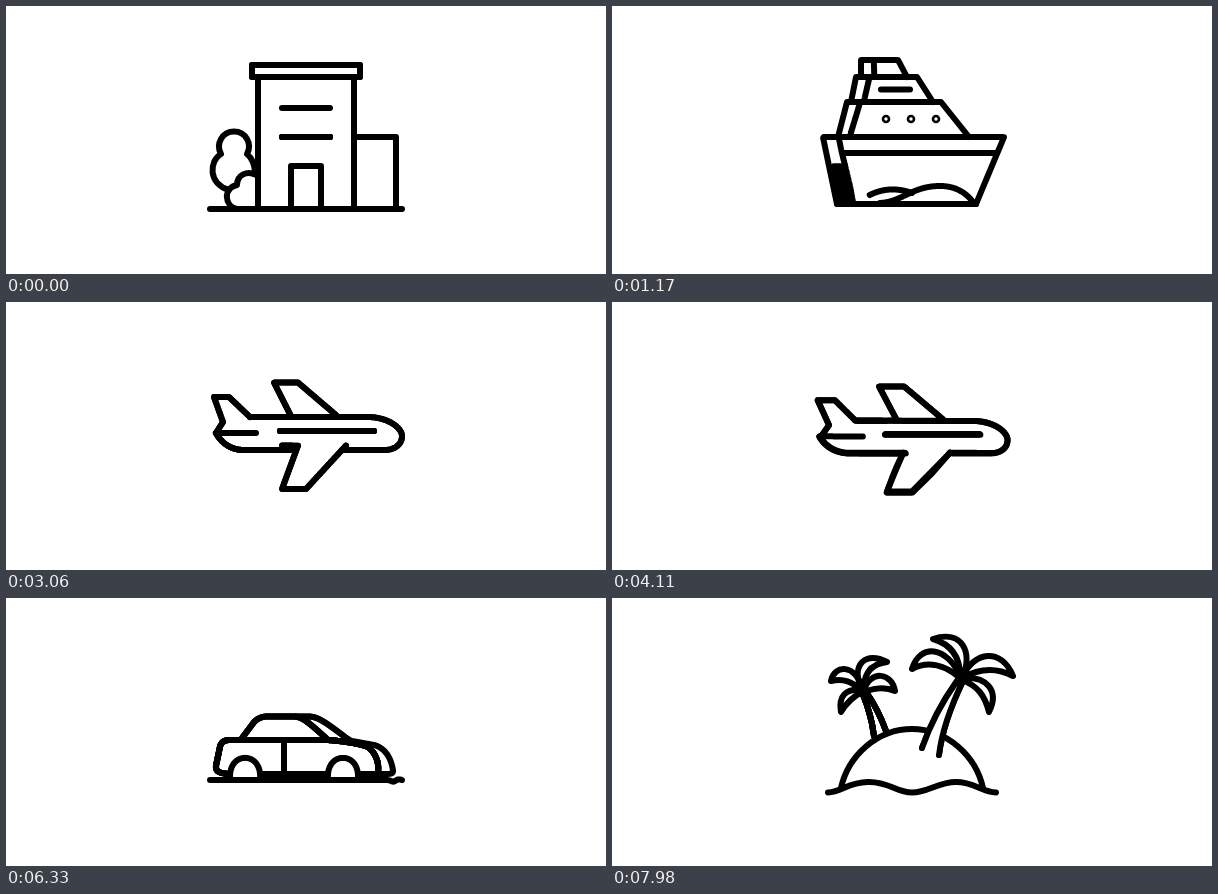
Recreate the animation shown at these times as an HTML page. Size 600 by 268 pixels, loop 8 s.

```html
<!DOCTYPE html>
<html lang="en">
<head>
<meta charset="utf-8">
<title>Morphing travel icons</title>
<style>
html, body { margin: 0; width: 100%; height: 100%; overflow: hidden; background: #fff; }
svg { display: block; width: 100vw; height: 100vh; }
path { fill: none; stroke: #000; stroke-width: 6; stroke-linecap: round; stroke-linejoin: round; }
</style>
</head>
<body>
<svg viewBox="0 0 600 268"><g id="icon"></g></svg>
<script>
const LOOP = 8000, SAMPLES = 200, BLOB = 16;
const icon = document.getElementById('icon');

const newPath = () => document.createElementNS('http://www.w3.org/2000/svg', 'path');
const ring = (x, y, r) => `M${x - r} ${y}a${r} ${r} 0 1 1 ${2 * r} 0a${r} ${r} 0 1 1 ${-2 * r} 0Z`;
const dot = (x, y) => ring(x, y, 1.3);
const speck = (x, y) => ring(x, y, 0.1);
const linear = k => k;
const leave = k => k ** 3;
const settle = k => 1 - (1 - k) ** 6;

// Each pose lists 17 strokes; a number repeats another stroke of the same pose.
const building = [
  'M204 203H396',
  'M252 203V71H348V203',
  'M246 59H354V71H246Z',
  'M348 131H390V203',
  'M285 203V160H315V203',
  'M276 102H324',
  'M276 131H324',
  'M223 184C202 178 203 155 215 148A15 15 0 1 1 241 148C246 152 249 158 249 168',
  'M231 203C218 200 217 182 231 179C231 169 241 164 250 169',
  6, 6, 6, 1, 1, 2, 1,
  speck(252, 200)
];

const shipForming = [
  'M225 198H364',
  'M225 198L211 131H392L364 198',
  'M249 71V54H286L295 71',
  'M226 131L235 96H329L357 131',
  'M239 96L244 71H305L321 96',
  'M269 83.5H298',
  'M232 147H384',
  'M258 189C272 182 286 182 300 187',
  'M268 197C290 196 300 180 328 180C344 180 354 187 361 196',
  dot(274, 113), dot(299, 113), dot(324, 113),
  'M238 131L247 97',
  'M252 96L257 71',
  'M262 54V71',
  'M227 132L240 196',
  'M222 160L229 160L240 197L227 197Z'
];

const ship = [
  'M220 198H366',
  'M220 198L204 131H396L366 198',
  'M249 71V53H286L295 71',
  'M226 131L235 96H329L357 131',
  'M239 96L244 71H305L321 96',
  'M269 83.5H298',
  'M210 147H388',
  'M222 190C244 182 276 178 300 187',
  'M260 197C284 196 298 180 328 180C346 180 356 187 365 196',
  dot(274, 113), dot(299, 113), dot(324, 113),
  3, 4, 2, 1,
  speck(222, 198)
];

const planeForming = [
  'M210 131C216 142 226 148 238 148H290',
  'M244 115H362C382 115 396 126 396 134C396 143 388 148 378 148H338',
  'M285 114L268 80.5H292L330 113',
  'M276 143.5H292L276 187H300L340 143.5',
  'M244 115L223 95H208L217 120L210 131',
  'M274 129H368',
  'M210 131H250',
  0, 1, 5, 5, 5, 3, 4, 2, 0,
  speck(212, 131)
];

const plane = [
  'M207 134C213 145 224 151 237 151H292',
  'M243 118H362C382 118 396 129 396 137C396 146 388 151 378 151H338',
  'M285 117L267 84H292L331 117',
  'M292 151L275 191H300L338 151',
  'M243 118L222 98H204L215 123L207 134',
  'M274 132H368',
  'M207 134H250',
  0, 1, 5, 5, 5, 3, 4, 2, 0,
  speck(209, 134)
];

const carForming = [
  'M220 179H388',
  'M252 138C240 135 236 134 230 134H220C213 134 212 137 211 144L209 160C210 167 214 168 230 173H384C393 173 394 167 390 157C386 148 382 146 370 143L336 140',
  'M252 138L256 123C258 116 262 113 268 113H296C305 113 309 117 314 121L336 139',
  1, 2,
  'M252 140H336',
  'M296 149V167',
  ring(252, 171, 7.5),
  ring(369, 171, 7.5),
  0, 5, 5, 2, 2, 2, 5,
  speck(252, 164)
];

const car = [
  'M204 180H396',
  'M231 138C226 138 222 138 218 138C212 139 211 141 210 147L207 163C207 169 210 171 222 171H384C392 171 393 166 391 158C388 147 382 143 370 141L342 137',
  'M232 137L245 114C248 109 252 107 258 107H300C308 107 312 109 317 113L344 137',
  1, 2,
  'M232 138H344',
  'M287 138V171',
  ring(246, 166, 14),
  ring(350, 166, 14),
  0, 5, 5, 2, 2, 2, 5,
  speck(246, 152)
];

const carLeaving = [
  'M204 182H380C386 182 386 185 389 183S393 181 396 182',
  'M222 176C212 175 209 173 210 167L214 148C216 143 219 142 225 142H320C340 143 358 147 362 149C372 157 373 168 372 175',
  'M236 140L248 124C252 120 256 118.5 262 118.5H288C297 119 303 125 320 140',
  'M340 142L368 147C382 151 386 165 387 173C387 175 386 176 382 176H355',
  'M290 118.5H303C312 119 318 123 343 142',
  1,
  'M278 142V176',
  'M224 181C223 168 230 160 239 160S255 168 254 181',
  'M322 181C321 168 328 160 337 160S353 168 352 181',
  'M255 176H322',
  1, 1, 2, 2, 4, 1,
  speck(343, 142)
];

const islandForming = [
  'M216 194.5C226 194 230 187 243 187C258 187 270 191 286 191C302 191 314 187 328 187C346 187 358 190 368 190C374 192 378 194 384 194.5',
  'M229 190C238 154 266 131 300 131S362 154 371 190',
  'M335 147C346 134 362 120 378 113L382 118C366 126 352 140 343 156',
  'M380 116C388 97 404 94 413 95C408 104 396 110 380 116Z',
  'M286 130L290 94L294 92L299 130',
  'M292 90C284 80 284 66 287 62C296 64 300 72 294 88Z',
  'M291 90C282 86 277 78 278 72C286 73 290 80 292 90Z',
  'M293 90C297 74 310 68 320 72C316 79 306 82 293 90Z',
  'M293 92C302 84 312 80 318 83C314 90 304 90 293 92Z',
  'M380 116C396 99 414 97 425 101C418 108 400 110 380 116Z',
  'M382 117C398 104 418 106 428 113C418 118 402 114 382 117Z',
  'M380 116C398 110 410 115 419 126C405 124 395 122 380 118Z',
  4, 4, 2, 4,
  'M382 116C388 102 400 98 407 98L410 114L400 118Z'
];

const island = [
  'M216 194.5C230 194 236 184 257 184S284 194.5 300 194.5S326 184 344 184S370 194 384 194.5',
  'M229 190C236 158 265 131 300 131S364 158 371 190',
  'M310 150C317 130 330 104 345 83L351 83C338 110 330 132 327 157',
  'M348 78C335 48 308 45 300 71C315 63 332 66 348 80Z',
  'M262 138C260 122 256 108 250 94L254 94C264 108 270 122 274 133',
  'M250 92C238 66 254 53 275 64C258 66 252 76 252 90Z',
  'M250 90C244 66 222 66 219 83C232 80 240 84 250 92Z',
  'M252 92C258 72 280 74 283 93C272 88 262 90 252 94Z',
  'M250 92C234 90 226 98 229 114C235 104 242 98 250 94Z',
  'M350 80C362 55 350 31 321 41C338 46 348 58 348 78Z',
  'M350 80C362 52 390 50 401 78C382 68 364 72 350 80Z',
  'M350 80C374 78 388 92 377 114C373 98 366 88 350 82Z',
  4, 4, 2, 4,
  'M346 79L352 77L350 84Z'
];

// [time, pose, easing towards the next key, strokes that hide what is behind]
const WHEELS = [7, 8], TRUNKS = [2, 14];
const keys = [
  [0, building, leave],
  [1170, shipForming, settle],
  [1950, ship, leave],
  [3060, planeForming, settle],
  [3820, plane, leave],
  [4920, carForming, settle, WHEELS],
  [5700, car, leave, WHEELS],
  [6330, carLeaving, linear],
  [7020, islandForming, settle, TRUNKS],
  [7980, island, linear, TRUNKS],
  [LOOP, island, linear, TRUNKS]
].map(([t, pose, ease, masks = []]) => ({ t, pose, ease, masks }));

const probe = newPath();
const stroke = (pose, i) => typeof pose[i] === 'number' ? stroke(pose, pose[i]) : pose[i];
const traces = new Map();

function trace(d) {
  if (!traces.has(d)) {
    probe.setAttribute('d', d);
    const len = probe.getTotalLength();
    traces.set(d, Array.from({ length: SAMPLES + 1 }, (_, n) => {
      const p = probe.getPointAtLength(len * n / SAMPLES);
      return [p.x, p.y];
    }));
  }
  return traces.get(d);
}

function blend(from, to, k) {
  const a = trace(from), b = trace(to);
  return 'M' + a.map(([x, y], n) =>
    (x + (b[n][0] - x) * k).toFixed(2) + ' ' + (y + (b[n][1] - y) * k).toFixed(2)).join('L');
}

for (const { pose } of keys) pose.forEach((_, i) => trace(stroke(pose, i)));
const lines = building.map(() => icon.appendChild(newPath()));

function draw(t) {
  let n = keys.length - 2;
  while (n && keys[n].t > t) n--;
  const a = keys[n], b = keys[n + 1];
  const k = a.ease((t - a.t) / (b.t - a.t));
  const masks = k > 0.5 ? b.masks : a.masks;
  lines.forEach((line, i) => {
    const from = stroke(a.pose, i), to = stroke(b.pose, i);
    line.setAttribute('d', from === to || k < 0.001 ? from : blend(from, to, k));
    line.style.fill = i === BLOB ? '#000' : masks.includes(i) ? '#fff' : 'none';
  });
}

const origin = performance.now();
function tick() {
  draw((performance.now() - origin) % LOOP);
  requestAnimationFrame(tick);
}
tick();
</script>
</body>
</html>
```
